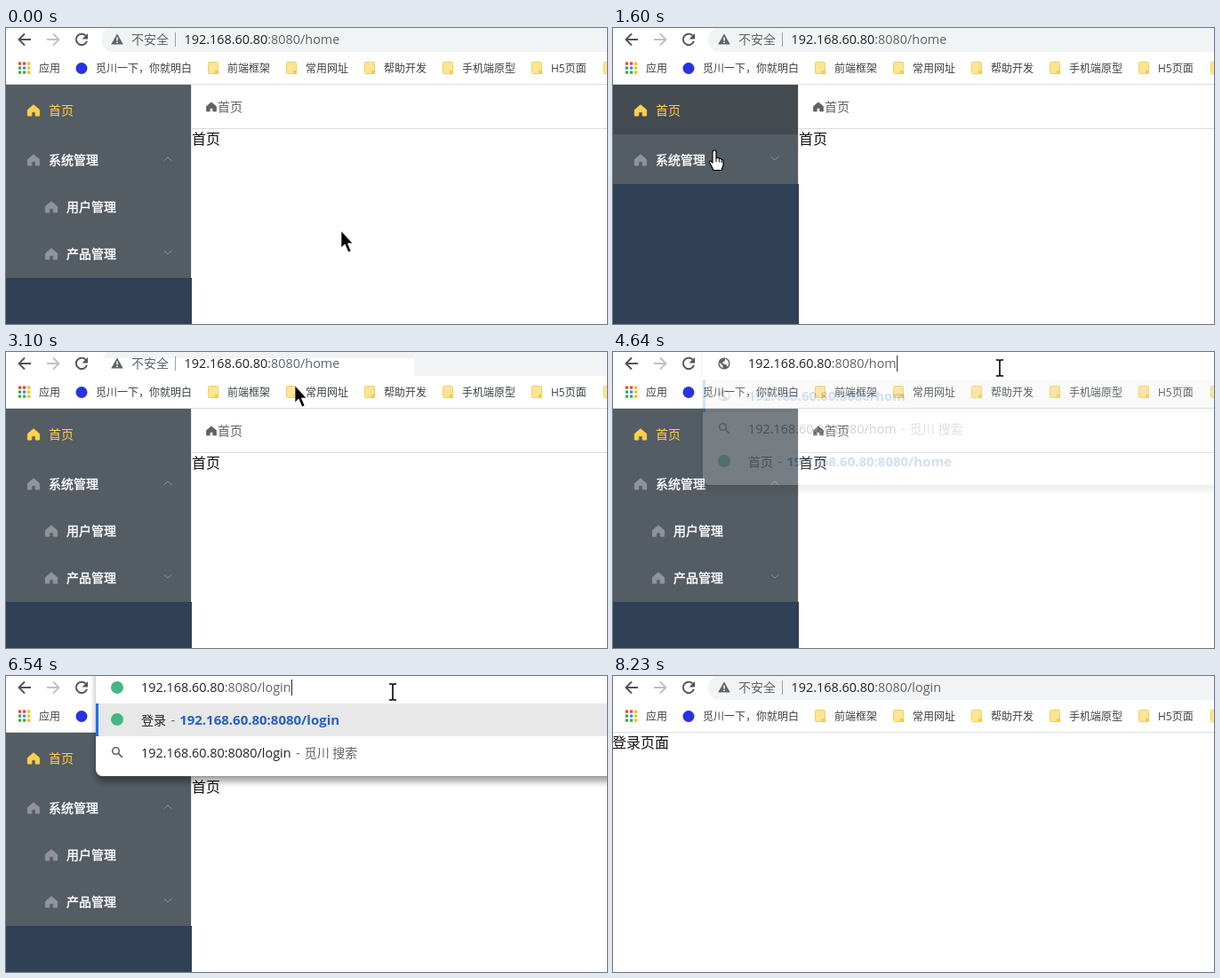
An HTML page that plays this animation: 676 px wide and 334 px high, repeating every 8.67 s.

```html
<!DOCTYPE html>
<html lang="zh-CN">
<head>
<meta charset="utf-8">
<title>Route demo</title>
<style>
  html, body { margin: 0; width: 100%; height: 100%; overflow: hidden; background: #fff; }
  svg { display: block; }
  text { font-family: "Open Sans", "Noto Sans CJK SC", "Noto Sans", sans-serif; }
</style>
</head>
<body>
<script>
const LOOP = 8670;
const HOST = '192.168.60.80', PORT = ':8080';
const INK = '#202124', GREY = '#5f6368', LINK = '#2560c4', BLUE = '#1a73e8', GREEN = '#41b883';
const LATIN = 14.4, BOLD = 15;

function add(parent, tag, attrs = {}) {
  const node = document.createElementNS('http://www.w3.org/2000/svg', tag);
  for (const k in attrs) node.setAttribute(k, attrs[k]);
  parent.append(node);
  return node;
}
const group = (p, attrs) => add(p, 'g', attrs);
const rect = (p, x, y, width, height, fill, more) => add(p, 'rect', { x, y, width, height, fill, ...more });
const path = (p, d, attrs) => add(p, 'path', { d, ...attrs });
const line = (p, d, stroke, width = 1) =>
  path(p, d, { fill: 'none', stroke, 'stroke-width': width });
const disc = (p, cx, cy, r, fill) => add(p, 'circle', { cx, cy, r, fill });
const show = (node, on) => { node.style.display = on ? '' : 'none'; };

function label(p, x, y, str, size, fill, more) {
  const node = add(p, 'text', { x, y, 'font-size': size, fill, ...more });
  node.textContent = str;
  return node;
}
// parts: [string, attributes] pairs laid out one after another
function run(p, x, y, parts) {
  const node = add(p, 'text', { x, y, 'font-size': LATIN, fill: INK });
  for (const [str, attrs] of parts) add(node, 'tspan', attrs).textContent = str;
  return node;
}

const svg = add(document.body, 'svg', { width: 676, height: 334, viewBox: '0 0 676 334' });
const defs = add(svg, 'defs');
const shadow = add(defs, 'filter', { id: 'shadow', x: '-10%', y: '-20%', width: '120%', height: '150%' });
add(shadow, 'feDropShadow', { dx: 0, dy: 6.5, stdDeviation: 3.8, 'flood-opacity': .35 });
const clip = rect(add(defs, 'clipPath', { id: 'menu' }), 0, 64, 209, 218, '#000');

// ---- icons ----
function house(p, x, y, fill, s = 1) {
  path(p, 'M0,-6.6 L7,-.6 V6.4 H2.3 V1.8 H-2.3 V6.4 H-7 V-.6Z', {
    fill, stroke: fill, 'stroke-linejoin': 'round', transform: `translate(${x} ${y}) scale(${s})`
  });
}
function globe(p, x, y) {
  const g = group(p, { transform: `translate(${x} ${y})` });
  disc(g, 0, 0, 6.6, GREY);
  path(g, 'M-5.2,-1 L-1.5,2.2 V5.2 Q-5,4 -5.2,-1Z M1,-5.2 Q5,-4 5.2,0 Q5,2.5 3.7,3.4 L2.5,1.5 L-1.5,0 V-1.8 L1,-3Z', { fill: '#fff' });
}
function lens(p, x, y) {
  add(p, 'circle', { cx: x - 1.5, cy: y - 1.5, r: 3.8, fill: 'none', stroke: GREY, 'stroke-width': 1.6 });
  line(p, `M${x + 1.4},${y + 1.4} l4.4,4.4`, GREY, 1.8);
}
const icons = { globe, lens, site: (p, x, y) => disc(p, x, y, 7, GREEN) };
const chevron = (p, y, dir) =>
  line(p, `M177.5,${y + 2 * dir} l4.5,${-4 * dir} 4.5,${4 * dir}`, '#909399');

// ---- home page ----
rect(svg, 0, 0, 676, 334, '#fff');
const home = group(svg);
house(home, 231, 89, '#606266', .78);
label(home, 238, 94, '首页', 14, '#606266');
rect(home, 209, 113, 467, 1, '#d8dce5');
label(home, 209, 131, '首页', 16, '#111');

rect(home, 0, 64, 209, 270, '#304156');
const menu = group(home, { 'clip-path': 'url(#menu)' });
rect(menu, 0, 64, 208, 218, '#545c64');
rect(menu, 208, 64, 1, 218, '#e6e6e6');
const homeHover = rect(menu, 0, 64, 208, 56, '#434a50');
const sysHover = rect(menu, 0, 120, 208, 56, '#434a50');
function item(x, y, str, fill, iconFill, more) {
  house(menu, x, y, iconFill, .95);
  label(menu, x + 17, y + 5, str, 14, fill, more);
}
const heavy = { stroke: '#fff', 'stroke-width': .4 };
item(31, 93, '首页', '#ffd04b', '#ffd04b');
item(31, 149, '系统管理', '#fff', '#909399', heavy);
item(51, 202, '用户管理', '#fff', '#909399', heavy);
item(51, 255, '产品管理', '#fff', '#909399', heavy);
const arrowUp = chevron(menu, 148, 1), arrowDown = chevron(menu, 147, -1);
chevron(menu, 253, -1);

// ---- login page ----
const login = group(svg);
rect(login, 0, 64, 676, 270, '#fff');
label(login, -1, 81, '登录页面', 16, '#111');

// ---- browser bars ----
const bars = group(svg);
rect(bars, 0, 0, 676, 63, '#fff');
rect(bars, 0, 63, 676, 1, '#dadce0');
rect(bars, 107, -1, 600, 28, '#f1f3f4', { rx: 14 });
const patch = rect(bars, 107, 7, 352, 20, '#fff');
const whitePill = rect(bars, 107, -1, 600, 28, '#fff');

line(bars, 'M28,13 H15 M21,6.5 L14.5,13 L21,19.5', '#505357', 1.9);
line(bars, 'M46,13 H59 M53,6.5 L59.5,13 L53,19.5', '#bdc1c6', 1.9);
line(bars, 'M89.6,8.6 A6.2,6.2 0 1 0 91,14.8', '#505357', 1.9);
path(bars, 'M92,6 V12.4 H85.6Z', { fill: '#505357' });

const address = group(bars);
path(address, 'M125,6.5 L131.8,18.5 H118.2Z', { fill: GREY });
rect(address, 124.3, 10.5, 1.5, 4, '#fff');
rect(address, 124.3, 15.6, 1.5, 1.5, '#fff');
label(address, 141, 18, '不安全', 14, GREY);
rect(address, 190, 5, 1, 16, '#9aa0a6');
const url = tail => run(address, 200.5, 18, [[HOST, {}], [PORT + tail, { fill: GREY }]]);
const homeUrl = url('/home'), loginUrl = url('/login');
const urlWidth = homeUrl.getComputedTextLength();
const picked = group(address);
rect(picked, 200.5, 4, urlWidth, 19, '#3390ff');
run(picked, 200.5, 18, [[HOST + PORT + '/home', { fill: '#fff' }]]);
const urlCaret = rect(address, 201.5 + urlWidth, 4, 1, 18, INK);

['#ea4335', '#ea4335', '#fbbc04', '#34a853', '#4285f4', '#fbbc04', '#34a853', '#34a853', '#fbbc04']
  .forEach((c, i) => rect(bars, 14 + i % 3 * 5, 38.5 + Math.floor(i / 3) * 5, 3.2, 3.2, c));
label(bars, 37, 50, '应用', 12, '#3c4043');
disc(bars, 85, 45.5, 6.5, '#2932e1');
label(bars, 101, 50, '觅川一下，你就明白', 12, '#3c4043');
[[227, '前端框架'], [315, '常用网址'], [403, '帮助开发'], [491, '手机端原型'], [591, 'H5页面'], [672, '']]
  .forEach(([x, str]) => {
    rect(bars, x + .5, 38.5, 11, 13, '#ffe594', { stroke: '#f0cf60', rx: 1 });
    rect(bars, x + 8, 48, 4, 4, '#f3cb4b');
    label(bars, x + 22, 50, str, 12, '#3c4043');
  });

// ---- address suggestions ----
const dash = ['-', { fill: GREY, dx: 5.5 }];
const strong = (str, dx = 0) => [str, { fill: LINK, 'font-weight': 700, 'font-size': BOLD, dx }];
const plain = str => [str, { fill: LINK }];
const visit = (title, bold, rest = '') =>
  ['site', [title, { 'font-size': /[a-z]/.test(title) ? LATIN : 14 }], dash, strong(HOST + PORT + bold, 5), plain(rest)];
const search = typed =>
  ['lens', [HOST + PORT + typed, {}], dash, ['觅川 搜索', { fill: GREY, 'font-size': 14, dx: 5 }]];

function suggest(icon, typed, completion, rows) {
  const g = group(svg), list = group(g);
  rect(list, 101, -20, 620, 59 + rows.length * 37, '#fff', { rx: 8, filter: 'url(#shadow)' });
  rect(list, 101, 31, 575, 37, '#e8e8e8');
  rect(list, 101, 31, 3, 37, BLUE);
  rows.forEach(([name, ...parts], i) => {
    const y = 50 + i * 37;
    icons[name](list, 125, y - 1);
    run(list, 152, y + 5, parts);
  });

  rect(g, 101, 0, 575, 28, '#fff');
  icons[icon](g, 125, 13);
  const field = run(g, 152, 18, [
    [HOST, {}], [PORT + typed, { fill: GREY }], [completion, { fill: '#fff' }]
  ]);
  const end = 152 + field.getComputedTextLength();
  if (completion) {
    const width = field.lastChild.getComputedTextLength();
    g.insertBefore(rect(g, end - width, 4, width, 19, '#3390ff'), field);
  } else rect(g, end + .5, 4, 1, 18, INK);
  return { g, list };
}

const panels = [
  suggest('globe', '/hom', '', [
    ['globe', strong(HOST + PORT + '/hom')], search('/hom'), visit('首页', '/home')
  ]),
  suggest('site', '/', '', [
    visit('首页', ''), search('/'), visit('首页', '/', 'system/item1'), visit('About', '/', 'about'),
    visit('登录', '/', 'login'), visit('首页', '/', 'home'), ['site', strong(HOST + PORT + '/'), plain('system/item2/')]
  ]),
  ...[1, 2, 3, 4, 5].map(n => {
    const typed = '/' + 'login'.slice(0, n), rest = 'login'.slice(n);
    return suggest('site', typed, rest, [visit('登录', typed, rest), search(typed)]);
  })
];

// ---- pointers ----
const pointers = { arrow: group(svg), hand: group(svg), beam: group(svg) };
path(pointers.arrow, 'M0,0 V19 L4.2,15 L8,24 L11,22.6 L7.4,14 H13Z', { fill: '#000', stroke: '#fff', 'stroke-width': .7 });
path(pointers.hand,
  'M-2,1 Q-2,-1 0,-1 Q2,-1 2,1 V8 Q4,6.5 5.5,8.5 Q7,7.5 8,9.5 Q10,9 10,11.5 V16 Q9,19 8,21.5 H-1 Q-3,17 -5,13.5 Q-6,11 -4,11 L-2,13Z',
  { fill: '#fff', stroke: '#000', 'stroke-width': 1.2, 'stroke-linejoin': 'round' });
line(pointers.hand, 'M2,8 V12 M5.4,9 V12.5 M8,10 V13', '#000');
line(pointers.beam, 'M-4,-9 H-1 L0,-8 L1,-9 H4 M0,-8 V8 M-4,9 H-1 L0,8 L1,9 H4', '#000', 1.6);

// ---- timeline: [start, value...] rows, each held until the next ----
const moves = [
  [0, 'arrow', 377, 229], [120, 'arrow', 365, 226], [400, 'arrow', 330, 218], [530, 'arrow', 262, 200],
  [670, 'hand', 190, 170], [800, 'hand', 135, 148], [930, 'hand', 114, 139], [2290, 'hand', 170, 118],
  [2420, 'arrow', 235, 96], [2560, 'arrow', 270, 80], [2710, 'arrow', 290, 68], [2830, 'arrow', 306, 55],
  [2980, 'arrow', 318, 45], [3100, 'arrow', 325, 38], [3220, 'arrow', 350, 31], [3350, 'beam', 388, 22],
  [3490, 'beam', 420, 19], [3630, 'beam', 435, 18], [7670, 'arrow', 455, 45], [7800, 'arrow', 500, 112],
  [7950, 'arrow', 552, 200], [8090, 'arrow', 602, 290], [8230, '', 0, 0]
];
const heights = [
  [0, 218], [1060, 183], [1200, 139], [1330, 112], [1870, 140], [2010, 184], [2150, 218]
];
// start, open panel, opacity of its list
const steps = [
  [0, -1, 0], [4490, 0, .03], [4640, 0, .2], [4790, 0, .7], [4910, 0, 1], [5340, 1, 1],
  [5870, 2, 1], [6040, 3, 1], [6210, 4, 1], [6380, 5, 1], [6540, 6, 1], [6810, 6, .4], [6930, -1, 0]
];
const at = (table, t) => table.findLast(row => row[0] <= t);

function draw(t) {
  const within = (a, b) => t >= a && t < b;
  const [, kind, x, y] = at(moves, t);
  for (const k in pointers) show(pointers[k], k === kind);
  if (kind) pointers[kind].setAttribute('transform', `translate(${x} ${y})`);

  clip.setAttribute('height', at(heights, t)[1]);
  const closed = within(1060, 1870);
  show(arrowUp, !closed);
  show(arrowDown, closed);
  show(homeHover, within(1600, 1750));
  show(sysHover, within(800, 1600) || within(1750, 2290));

  const [, open, alpha] = at(steps, t);
  panels.forEach(({ g, list }, i) => {
    show(g, i === open);
    list.setAttribute('opacity', alpha);
  });

  const sent = t >= 6930;
  show(patch, within(2560, 3630));
  show(whitePill, within(3630, 6930));
  show(address, open < 0);
  show(homeUrl, !sent);
  show(loginUrl, sent);
  show(picked, within(3630, 3900));
  show(urlCaret, within(3900, 4490));
  show(home, t < 7220);
  show(login, t >= 7220);
}

const start = performance.now();
function tick() {
  draw((performance.now() - start) % LOOP);
  requestAnimationFrame(tick);
}
draw(0);
requestAnimationFrame(tick);
</script>
</body>
</html>
```
